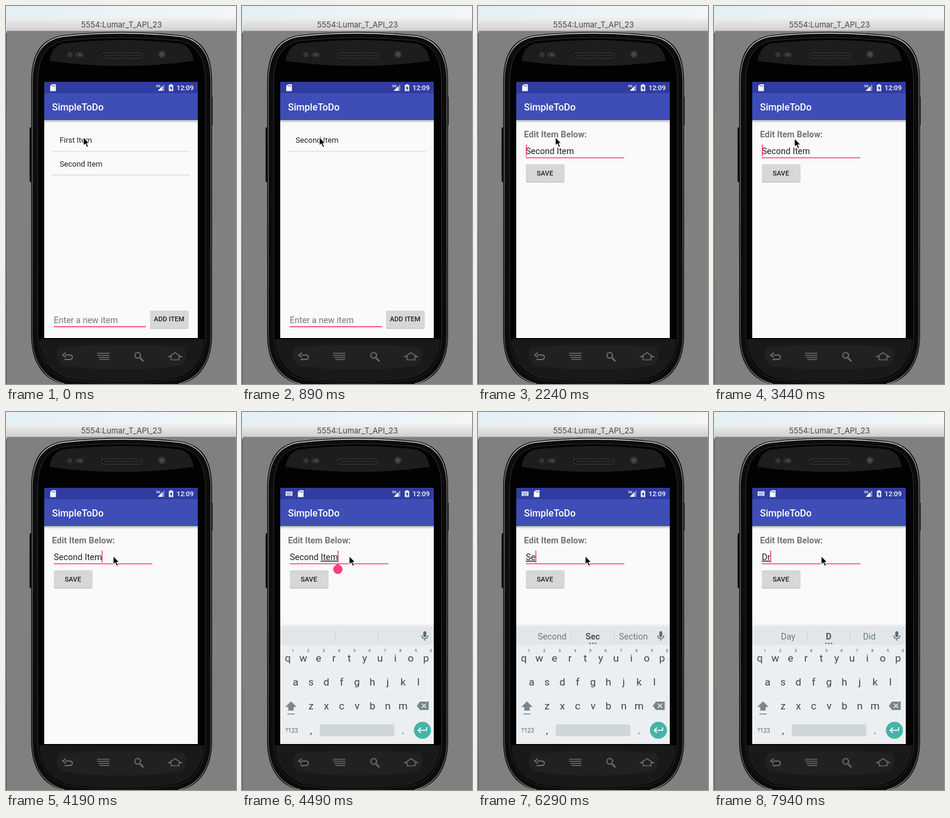
Recreate the animation shown at these times as an HTML page. Size 385 by 633 pixels, loop 8 s.

```html
<!DOCTYPE html>
<html lang="en">
<head>
<meta charset="utf-8">
<title>To-do app demo</title>
<style>
html, body { margin: 0; width: 100%; height: 100%; overflow: hidden; background: #808080; }
svg { display: block; width: 385px; height: 633px; font-family: Roboto, sans-serif; }
text { white-space: pre; fill: #212121; }
.mid { text-anchor: middle; }
.row { font-size: 12.85px; }
.field { font-size: 14.45px; }
.btn { font-size: 11.24px; font-weight: 500; text-anchor: middle; }
.pink { fill: #ff4081; }
.key { font-size: 17.4px; text-anchor: middle; fill: #37474f; }
.digit { font-size: 7px; font-weight: 500; text-anchor: middle; fill: #66757d; }
.hint { font-size: 14.45px; text-anchor: middle; fill: #6d7980; }
.u { text-decoration: underline; }
</style>
</head>
<body>
<svg viewBox="0 0 385 633">
<defs>
  <linearGradient id="bar" x2="0" y2="1"><stop stop-color="#efefef"/><stop offset="1" stop-color="#d0d0d0"/></linearGradient>
  <linearGradient id="sky" x2="1" y2="0"><stop stop-color="#e3f0f5"/><stop offset="1" stop-color="#f2f6f8"/></linearGradient>
  <linearGradient id="desk" x2="0" y2="1"><stop stop-color="#4b4a3c"/><stop offset=".4" stop-color="#777661"/><stop offset="1" stop-color="#52503f"/></linearGradient>
  <linearGradient id="rim" x2="0" y2="1"><stop stop-color="#e0e0e0"/><stop offset=".12" stop-color="#777"/><stop offset=".9" stop-color="#555"/><stop offset="1" stop-color="#999"/></linearGradient>
  <linearGradient id="drop" x2="0" y2="1"><stop stop-opacity=".26"/><stop offset="1" stop-opacity="0"/></linearGradient>
  <clipPath id="screen"><path d="M64 127H321V556H64Z"/></clipPath>
  <clipPath id="firstRow"><path d="M77 204H308V243H77Z"/></clipPath>
  <g id="button">
    <rect y="1.2" width="64.5" height="29.5" rx="2" fill="#000" opacity=".2"/>
    <rect width="64.5" height="29" rx="1.6" fill="#d6d7d7"/>
  </g>
  <g id="chrome">
    <path d="M64 127H321V556H64Z" fill="#fafafa"/>
    <path d="M64 127H321V146H64Z" fill="#303c9f"/>
    <path d="M64 146H321V191H64Z" fill="#3e4eb6"/>
    <path d="M64 191H321V196H64Z" fill="url(#drop)"/>
    <text x="77" y="175" font-size="16.06" font-weight="500" style="fill:#fff">SimpleToDo</text>
    <g id="keysIcon" fill="#e3e6f6">
      <path d="M73 133H84.500V140.500H73Z"/>
      <path d="M74.500 135H83M74.500 137H83M76 139H82" stroke="#303c9f" stroke-dasharray="1 .8"/>
    </g>
    <g id="card">
      <path d="M77 131H83.500V142.500H74V134Z" fill="#fff"/>
      <path d="M77.500 132.500V135M79.500 132.500V135M81.500 132.500V135" stroke="#303c9f" stroke-width=".9"/>
    </g>
    <text x="251" y="136" font-size="6" font-weight="700" style="fill:#fff">3G</text>
    <path d="M265 131V142H254Z" fill="#8790c9"/>
    <path d="M261.500 134.500V142H254Z" fill="#fff"/>
    <path d="M274.500 131H278V132.300H280V142.500H272.500V132.300H274.500Z" fill="#e8eaf6"/>
    <path d="M277 133.500L274 138H276V141.500L279 136.800H277Z" fill="#303c9f"/>
    <text x="285.500" y="141" font-size="11.24" font-weight="500" style="fill:#fff">12:09</text>
  </g>
</defs>

<!-- desktop and window -->
<path d="M0 0H385V633H0Z" fill="url(#sky)"/>
<path d="M0 45H1V633H0Z" fill="url(#desk)"/>
<path d="M1 41H385V633H1Z" fill="#808080"/>
<path d="M1 41V24Q1 20 5 20H385V41Z" fill="url(#bar)"/>
<path d="M1 41.500H385" stroke="#b3b3b3"/>
<text class="mid" x="193.500" y="35.500" font-size="13" style="font-family:Inter,sans-serif;fill:#484848">5554:Lumar_T_API_23</text>

<!-- phone -->
<path d="M39.500 205Q39.500 203 43 203V295Q39.500 295 39.500 293ZM343 152H345.800V199H343Z" fill="#0a0a0a"/>
<path d="M42 128C42 80 58 55 95 49Q193 38 292 49C329 55 345 80 345 128V550C345 592 329 625 289 634H98C58 625 42 592 42 550Z" fill="#0c0c0c"/>
<path d="M44 128C44 82 60 57 95 51Q193 40 292 51C327 57 343 82 343 128V550C343 590 328 622 289 633M98 633C59 622 44 590 44 550V128" fill="none" stroke="url(#rim)" stroke-width="1.300"/>
<path d="M53 130C53 88 66 64 98 58Q193 48 289 58C321 64 334 88 334 130V550C334 586 321 614 287 625Q193 640 100 625C66 614 53 586 53 550Z" fill="#020202" stroke="#303030"/>
<path d="M94 63Q193 51 293 63Q311 69 314 92Q193 109 73 92Q76 69 94 63Z" fill="#1d1d1d"/>
<path d="M55 558H332C330 588 318 612 286 623Q193 638 101 623C69 612 57 588 55 558Z" fill="#191919"/>
<path d="M90 571Q193 564 297 571Q309 585 294 602Q193 616 93 602Q78 585 90 571Z" fill="#212121"/>
<circle cx="107" cy="81.500" r="4.500" fill="#343434"/>
<rect x="116" y="77.500" width="14" height="8" rx="4" fill="#303036"/>
<circle cx="124" cy="81.500" r="2.500" fill="#454550"/>
<rect x="160.500" y="79" width="67" height="8" rx="4" fill="#080808" stroke="#4b4b4b"/>
<path d="M164 83H225" stroke="#444" stroke-width="4" stroke-dasharray="1.500 1.500"/>
<circle cx="261" cy="81" r="6" fill="#383838"/>
<circle cx="261" cy="81" r="3" fill="#4b4b4b"/>
<g fill="none" stroke="#6c6c6c" stroke-width="2">
  <path d="M99 584.500H107Q111 584.500 111 588T107 592H98M100 580.500L95 584.500L100 588.500"/>
  <path d="M152.500 581.500H173M152.500 585H173M154.500 588.500H173M156.500 592H173" stroke-width="1.500"/>
  <circle cx="220.500" cy="585" r="4.700"/><path d="M224 589L230 595" stroke-width="2.600"/>
  <path d="M272.500 587.500L283 580.500L293.500 587.500H289.500V592.500H276.500V587.500Z" stroke-width="1.700"/>
</g>

<g clip-path="url(#screen)">
  <g id="list">
    <use href="#chrome"/>
    <ellipse id="ripple" clip-path="url(#firstRow)" fill="#ececec"/>
    <path d="M77 243.300H308" stroke="#dadada" stroke-width="1.300"/>
    <text class="row" id="row1" x="89.700" y="228.500"></text>
    <g id="row2">
      <text class="row" x="89.700" y="268.500">Second Item</text>
      <path d="M77 283H308" stroke="#dadada" stroke-width="1.300"/>
    </g>
    <text class="field" x="80" y="530.500" style="fill:#757575">Enter a new item</text>
    <path class="pink" d="M80 536.200H234V537.900H80Z"/>
    <path class="pink" id="newCaret" d="M80 514H81.600V535H80Z"/>
    <use href="#button" x="241" y="510"/>
    <text class="btn" x="273" y="528.300">ADD ITEM</text>
  </g>
  <g id="edit">
    <use href="#chrome"/>
    <text class="field" x="77" y="220" font-weight="700" style="fill:#757575">Edit Item Below:</text>
    <path class="pink" d="M80 253.500H245V255.100H80Z"/>
    <text class="field" id="value" x="80" y="248"><tspan></tspan><tspan></tspan></text>
    <path class="pink" id="caret" d="M0 232H1.600V252H0Z"/>
    <use href="#button" x="80" y="265"/>
    <text class="btn" x="112" y="284">SAVE</text>
    <path class="pink" id="handle" d="M160.500 253.500L166 258A7.800 7.800 0 1 1 155 258Z"/>
  </g>
  <g id="keyboard">
    <path d="M64 355H321V359H64Z" fill="#000" opacity=".035"/>
    <path d="M64 358.500H321V390H64Z" fill="#e2e6e9"/>
    <path d="M64 390H321V556H64Z" fill="#eceff1"/>
    <path d="M156 365V384M228 365V384" stroke="#cbd2d6"/>
    <g id="hints">
      <text class="hint" x="124" y="381"></text>
      <text class="hint" x="192" y="381" font-weight="700" style="fill:#4b5a62"></text>
      <text class="hint" x="260" y="381"></text>
    </g>
    <path id="dots" d="M186.500 387.500H198" stroke="#45545c" stroke-width="2" stroke-dasharray="2.200 2.400"/>
    <rect x="303.500" y="367" width="5" height="10" rx="2.500" fill="#5d6c74"/>
    <path d="M301 374Q301 379.500 306 379.500T311 374M306 379.500V383" fill="none" stroke="#5d6c74" stroke-width="1.400"/>
    <g id="keys"></g>
    <path d="M82 484.500L91.500 494H86.500V500H77.500V494H72.500ZM76 505H88V506.600H76Z" fill="#78868d"/>
    <path d="M298 485H312.500V499H298L292.500 492Z" fill="#78868d"/>
    <path d="M301 488.500L308 495.500M308 488.500L301 495.500" stroke="#eceff1" stroke-width="1.600"/>
    <text class="mid" x="83" y="536.500" font-size="10" style="fill:#56666e">?123</text>
    <text class="key" x="115.500" y="538.500">,</text>
    <rect x="130" y="523" width="125" height="19.500" rx="3" fill="#cfd6da"/>
    <text class="key" x="269.500" y="538.500">.</text>
    <circle cx="302" cy="533" r="14.300" fill="#43b5a8"/>
    <path d="M309 528V533H295.500M299.500 528.500L295 533L299.500 537.500" fill="none" stroke="#fff" stroke-width="1.700"/>
  </g>
</g>
<path id="pointer" d="M0 0V14.500L3.300 11.400L5.700 17L8.300 15.900L5.900 10.500H10.200Z" fill="#000" stroke="#fff" stroke-width="1.100"/>
</svg>

<script>
const $ = id => document.getElementById(id);
const show = (id, on) => { $(id).style.display = on ? '' : 'none'; };
const within = (t, ...spans) => spans.some(([from, to]) => t >= from && t < to);

const keyRows = [['qwertyuiop', 76.8, 417.500], ['asdfghjkl', 89.700, 457.800], ['zxcvbnm', 115.500, 498.300]];
$('keys').innerHTML = keyRows.map(([letters, x0, y], row) => [...letters].map((letter, i) => {
  const x = x0 + i * 25.7;
  const digit = row ? '' : `<text class="digit" x="${x + 8.500}" y="401.500">${(i + 1) % 10}</text>`;
  return `<text class="key" x="${x}" y="${y}">${letter}</text>${digit}`;
}).join('')).join('');

// start time, field text, suggestions
const typing = [
  [0, 'Second Item', ''],
  [4640, 'Second Item', 'Items|Item|It'],
  [4940, 'Second Ite', 'Items|Item|It'],
  [5090, 'Second Ite', 'Item|Ite|Items'],
  [5240, 'Second It', 'Item|Ite|Items'],
  [5390, 'Second I', 'Its|It|It’s'],
  [5540, 'Second ', 'I’m|I|In'],
  [5690, 'Second', 'and|one|time'],
  [5840, 'Secon', 'Seconds|Second|Section'],
  [5990, 'Seco', 'Second|Secon|Seconds'],
  [6140, 'Sec', 'Second|Seco|Section'],
  [6290, 'Se', 'Second|Sec|Section'],
  [6440, 'Se', 'See|Se|Set'],
  [6590, 'S', 'See|Se|Set'],
  [6740, '', 'So|S|See'],
  [6890, '', 'I’m|I|The'],
  [7790, 'D', 'I’m|I|The'],
  [7940, 'Dr', 'Day|D|Did']
];

function drawList(t) {
  const removed = t >= 590;
  $('row1').textContent = removed ? 'Second Item' : 'First Item';
  show('row2', !removed);
  show('newCaret', within(t, [290, 890], [1340, 1790]));
  const [x, r] = t >= 1940 ? [144.700, 64.300] : [130, 21];
  show('ripple', within(t, [590, 890], [1790, 2240]));
  for (const [name, v] of Object.entries({ cx: x, cy: 224, rx: r, ry: r })) $('ripple').setAttribute(name, v);
}

function drawEdit(t) {
  const [, text, words] = typing.findLast(step => t >= step[0]);
  const keyboard = t >= 4340;
  const cut = text.lastIndexOf(' ') + 1;
  const [before, word] = $('value').children;
  before.textContent = text.slice(0, cut);
  word.textContent = text.slice(cut);
  word.setAttribute('class', keyboard ? 'u' : '');
  const caretX = 80 + (t >= 4190 && text ? Math.floor($('value').getComputedTextLength()) : 0);
  $('caret').setAttribute('transform', `translate(${caretX})`);
  show('caret', !within(t, [2540, 3140], [3740, 4190], [7490, 7790]));
  show('handle', within(t, [4340, 4940]));
  show('keysIcon', keyboard);
  $('card').setAttribute('transform', `translate(${keyboard ? 19.500 : 0})`);

  const opening = t < 2240;
  $('edit').setAttribute('opacity', opening ? .6 : 1);
  $('edit').setAttribute('transform', `translate(0 ${opening ? 14 : 0})`);

  const rising = t < 4490;
  show('keyboard', keyboard);
  $('keyboard').setAttribute('opacity', rising ? .6 : 1);
  $('keyboard').setAttribute('transform', `translate(0 ${rising ? 60 : 0})`);
  const parts = words.split('|');
  [...$('hints').children].forEach((el, i) => { el.textContent = parts[i] || ''; });
  show('dots', t >= 5090);
}

function draw(now) {
  const time = now % 8000;
  const t = time < 140 ? 0 : 140 + Math.floor((time - 140) / 150) * 150;
  const p = Math.min(1, Math.max(0, (t - 3290) / 750));
  const ease = p * p * (3 - 2 * p);
  $('pointer').setAttribute('transform', `translate(${129.500 + 50 * ease} ${219.500 + 21.500 * ease})`);
  show('list', t < 2240);
  show('edit', t >= 2090);
  drawList(t);
  drawEdit(t);
  requestAnimationFrame(() => draw(performance.now() - start));
}
const start = performance.now();
draw(0);
</script>
</body>
</html>
```
